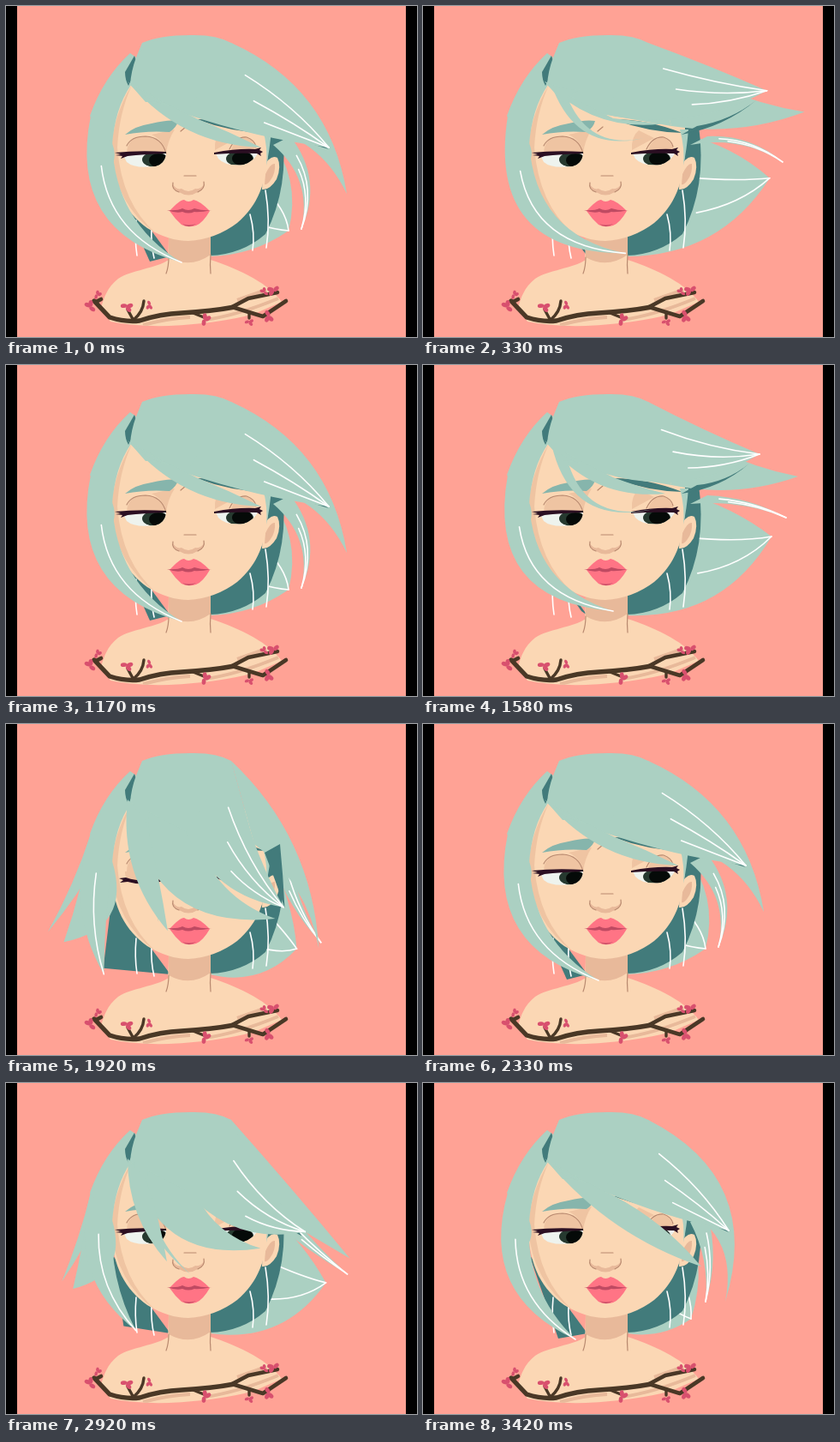
These frames come from a looping animation (480 px wide and 386 px high, 3.51 s). An HTML page:

```html
<!DOCTYPE html>
<html lang="en">
<head>
<meta charset="utf-8">
<title>Wind in her hair</title>
<style>
  html, body { margin: 0; width: 100%; height: 100%; overflow: hidden; background: #000; }
  svg { display: block; width: 100vw; height: 100vh; }
  .skin { fill: #fbd7b4; }
  .shade { fill: #e8b99a; }
  .soft { fill: #efc4a2; }
  .fine { fill: none; stroke: #b98a70; stroke-width: 1.2; stroke-linecap: round; }
  .lash { fill: #2b0f22; }
  .iris { fill: #26392f; }
  .pupil { fill: #050a08; }
  .twig { fill: none; stroke: #4a3826; stroke-linecap: round; stroke-linejoin: round; }
  .light { fill: #abd0c2; }
  .dark { fill: #427b7b; }
  .strand { fill: none; stroke: #fff; stroke-width: 1.6; stroke-linecap: round; }
</style>
</head>
<body>
<svg viewBox="0 0 480 386">
  <defs>
    <clipPath id="bodyClip"><path id="torso" d="M190 296C175 306 146 308 131 318C118 328 114 341 111 352L122 368Q150 374 190 373Q250 370 290 359L322 345C308 325 276 308 239 296Z"/></clipPath>
    <clipPath id="eyeL"><path id="whiteL" d="M137 174Q160 170 187 171Q186 184 174 187Q150 190 141 182Z"/></clipPath>
    <clipPath id="eyeR"><path id="whiteR" d="M245 172Q270 168 296 169Q290 181 277 185Q256 187 248 178Z"/></clipPath>
    <g id="flower" fill="#d8506e">
      <ellipse cx="-3.5" rx="3.5" ry="2.3" transform="rotate(20)"/>
      <ellipse cy="-3" rx="2.3" ry="3.4"/>
      <ellipse cx="3" cy="1.5" rx="3.4" ry="2.2" transform="rotate(35)"/>
    </g>
  </defs>

  <rect x="13" width="454" height="386" fill="#ffa295"/>

  <g id="back"></g>
  <path class="dark" d="M300 140H322Q332 210 303 266Q275 290 238 291V240Z"/>
  <path class="strand" d="M303 215Q309 250 304 282M285 243Q291 265 288 285M152 250Q150 272 153 291M170 258Q169 278 173 294"/>

  <use href="#torso" class="skin"/>
  <path class="skin" d="M190 260H239V314H187Q190 300 190 260Z"/>
  <path class="shade" d="M190 260H239V290Q215 307 190 293Z"/>
  <path class="fine" d="M190 293Q190 304 187 312M239 290Q238 302 239 312"/>
  <path clip-path="url(#bodyClip)" fill="none" stroke="#e8b99a" stroke-width="4" d="M232 366Q270 361 318 341M270 343L304 331M160 372Q190 364 215 363"/>
  <g class="twig">
    <path stroke-width="5.4" d="M103 344L121 363Q140 369 156 367Q180 359 205 358Q240 356 267 351"/>
    <path stroke-width="4.6" d="M264 351L300 362L327 344M264 351L283 341L317 334M105 345L111 342"/>
    <path stroke-width="3.4" d="M148 365L142 354M149 366Q160 357 161 344M216 357L231 363M284 357V364"/>
  </g>
  <g id="flowers"></g>

  <path class="skin" d="M300 190Q308 172 317 177Q322 187 316 202Q308 215 299 214Z"/>
  <path class="shade" d="M303 196Q309 183 314 184Q315 195 309 203Q305 209 302 208Z"/>
  <path class="skin" d="M150 78C134 108 122 140 123 170C124 215 140 241 165 259Q190 274 213 274Q245 272 270 253C295 232 304 205 306 170V120Q240 60 150 78Z"/>
  <path class="soft" d="M147 92Q124 130 123 170Q128 232 175 265Q135 230 130 165Q132 125 147 92Z"/>

  <path class="shade" d="M195 208Q199 215 205 213Q213 219 221 213Q228 214 231 208Q232 214 224 217Q213 224 202 217Q194 214 195 208Z"/>
  <path class="fine" d="M208 198H222M195 206Q193 214 202 217M231 205Q233 213 224 217M204 146L210 141"/>
  <path fill="#ff7485" d="M191 239Q203 226 208 226Q213 230 219 226Q226 227 238 239Q230 253 222 256Q212 259 205 255Q197 248 191 239Z"/>
  <path fill="#bf4a62" d="M188 238Q200 239 206 236Q213 240 220 236Q230 239 240 238Q226 241 220 240Q213 243 206 240Q199 242 188 238ZM206 254Q213 257 222 254Q213 260 206 254Z"/>

  <path class="soft" d="M187 172Q184 156 170 150L197 144Q189 156 187 172ZM244 168Q243 152 252 145L270 154Z"/>
  <path class="soft" d="M141 172Q141 152 163 152Q184 152 187 172ZM262 170Q267 154 280 153Q291 157 293 169Z"/>
  <path class="fine" d="M141 163Q146 152 163 152Q182 153 187 172M261 167Q268 152 281 153Q290 156 292 164"/>
  <g id="open">
    <use href="#whiteL" fill="#eef3ee"/>
    <g clip-path="url(#eyeL)"><ellipse class="iris" cx="174" cy="179" rx="15" ry="9"/><ellipse class="pupil" cx="178" cy="180" rx="11" ry="8"/></g>
    <use href="#whiteR" fill="#eef3ee"/>
    <g clip-path="url(#eyeR)"><ellipse class="iris" cx="273" cy="178" rx="16" ry="9"/><ellipse class="pupil" cx="276" cy="178" rx="12" ry="8"/></g>
    <path class="lash" d="M187 172Q160 173 142 175L134 178L136 175L128 174L134 173L127 171Q155 168 187 170ZM243 171Q270 166 291 167L298 165L296 168L300 170L297 172L298 175L293 172Q268 171 243 173Z"/>
  </g>
  <g id="closed">
    <path class="soft" d="M139 172Q138 181 150 184Q172 186 186 180L187 171ZM248 172Q256 184 275 183L296 174V168Z"/>
    <path class="lash" d="M186 180Q160 186 140 179L132 180L137 182L133 185L142 184Q164 190 186 182ZM246 178Q270 186 297 174Q272 190 246 180Z"/>
  </g>
  <path fill="#86b5ac" d="M139 150Q150 140 170 137Q190 132 201 134Q199 142 191 147Q164 145 139 150Z"/>
  <path class="dark" d="M222 132Q262 132 303 148Q262 147 222 132Z"/>
  <path class="light" d="M300 144H310Q308 168 304 186Q306 166 300 144Z"/>

  <g id="right"></g>
  <g id="left"></g>
  <path class="light" d="M145 55Q114 83 98 128L99 130L124 162Q127 120 146 92L152 60Z"/>
  <path class="dark" d="M150 58L139 77Q139 86 143 93L154 70Z"/>
  <path class="light" d="M159 43Q180 34 215 34Q245 33 263 43L290 140L210 126Q165 112 145 92Q146 76 152 60Z"/>
  <g id="fringe"></g>

  <path d="M0 0H13V386H0ZM467 0H480V386H467Z"/>
</svg>
<script>
const NS = "http://www.w3.org/2000/svg";
const $ = id => document.getElementById(id);

// One swing: steps at which hair is at rest, blown out, over the face, settling.
const KEYS = [0, 5, 8, 13], CYCLE = 14, STEPS = 42, LOOP = 3510;

// A lock runs from two roots to one tip; each pose is tip x, tip y, bend.
// "puff" spreads its two edges apart, "strands" are white hairs inside it.
const locks = {
  back: [
    { roots: [305, 150, 238, 292], puff: .2, strands: 2,
      poses: [[330, 262, .05], [407, 200, -.1], [355, 250, -.1], [313, 275, 0]] },
    { kind: "dark", roots: [124, 200, 192, 292],
      poses: [[168, 298, 0], [185, 287, 0], [118, 283, 0], [158, 298, 0]] }
  ],
  right: [
    { roots: [332, 152, 312, 162], strands: 2,
      poses: [[345, 260, .3], [424, 178, .12], [383, 245, -.1], [330, 255, .15]] },
    { roots: [263, 43, 290, 140],
      poses: [[398, 219, .27], [438, 130, -.14], [383, 240, .1], [353, 255, .42]] },
    { kind: "dark", roots: [320, 140, 302, 150],
      poses: [[377, 167, .05], [381, 115, -.15], [331, 206, 0], [357, 174, 0]] }
  ],
  left: [
    { roots: [99, 128, 112, 150],
      poses: [[112, 200, 0], [112, 200, 0], [48, 243, .05], [112, 200, 0]] },
    { roots: [99, 128, 124, 160], puff: -.25,
      poses: [[108, 200, .2], [108, 200, .2], [67, 255, .3], [108, 200, .2]] },
    { roots: [99, 128, 124, 160], puff: -.1, strands: 1,
      poses: [[205, 299, -.37], [222, 287, -.45], [123, 290, -.15], [178, 299, -.33]] }
  ],
  fringe: [
    { roots: [222, 131, 146, 92], puff: .12,
      poses: [[298, 165, -.1], [283, 150, -.15], [305, 212, -.4], [325, 214, -.02]] },
    { roots: [263, 43, 210, 126], puff: .1, strands: 3,
      poses: [[377, 165, .05], [393, 104, -.12], [331, 204, -.2], [357, 172, .05]] },
    { roots: [166, 100, 150, 92],
      poses: [[190, 117, 0], [270, 168, -.5], [189, 240, -.1], [190, 117, 0]] },
    { roots: [163, 112, 142, 88], puff: .12,
      poses: [[185, 115, 0], [185, 115, 0], [189, 243, -.1], [185, 115, 0]] }
  ]
};

const mix = (p, q, u) => p.map((x, i) => x + (q[i] - x) * u);
const fmt = p => p.map(x => x.toFixed(1)).join(" ");

// Control point of a hair from root to tip, pushed sideways by the bend.
function bow([x, y], [tx, ty], bend) {
  return [(x + tx) / 2 + (ty - y) * bend, (y + ty) / 2 - (tx - x) * bend];
}

function addPath(parent, kind) {
  const el = document.createElementNS(NS, "path");
  el.setAttribute("class", kind);
  return parent.appendChild(el);
}

// Cyclic cubic interpolation through unevenly spaced poses.
function sample(poses, step) {
  const n = KEYS.length;
  const wrap = i => (i + n) % n;
  const gap = i => (KEYS[wrap(i + 1)] - KEYS[wrap(i)] + CYCLE) % CYCLE;
  const i = KEYS.findLastIndex(k => k <= step);
  const h = gap(i), s = (step - KEYS[i]) / h, r = 1 - s;
  return poses[0].map((_, c) => {
    const at = j => poses[wrap(j)][c];
    const rate = j => (at(j + 1) - at(j)) / gap(j);
    const slope = j => (rate(j - 1) * gap(j) + rate(j) * gap(j - 1)) / (gap(j) + gap(j - 1));
    return at(i) * (1 + 2 * s) * r * r + at(i + 1) * s * s * (3 - 2 * s)
      + h * s * r * (slope(i) * r - slope(i + 1) * s);
  });
}

function makeLock(parent, { kind = "light", roots, puff = 0, strands = 0, poses }) {
  const a = roots.slice(0, 2), b = roots.slice(2);
  const body = addPath(parent, kind);
  const hairs = Array.from({ length: strands }, () => addPath(parent, "strand"));
  return step => {
    const [x, y, bend] = sample(poses, step), tip = [x, y];
    const ca = bow(a, tip, bend + puff), cb = bow(b, tip, bend - puff);
    body.setAttribute("d", `M${fmt(a)}Q${fmt(ca)} ${fmt(tip)}Q${fmt(cb)} ${fmt(b)}Z`);
    hairs.forEach((el, i) => {
      const u = (i + 1) / (strands + 1), from = .2 + .15 * i;
      const root = mix(a, b, u), c = mix(ca, cb, u), c2 = mix(c, tip, from);
      const start = mix(mix(root, c, from), c2, from);
      el.setAttribute("d", `M${fmt(start)}Q${fmt(c2)} ${fmt(tip)}`);
    });
  };
}

const flowers = [[99, 350], [107, 337], [141, 351], [167, 349], [312, 331], [302, 333], [233, 366], [284, 369], [306, 362]];
$("flowers").innerHTML = flowers.map(([x, y], i) =>
  `<use href="#flower" transform="translate(${x} ${y}) rotate(${i * 70}) scale(${i % 2 ? .8 : 1.1})"/>`).join("");

const hair = Object.entries(locks).flatMap(([id, list]) => list.map(l => makeLock($(id), l)));
const startOf = k => Math.round(k * 25 / 3) * 10;
const t0 = performance.now();
let shown = -1;

function draw() {
  const t = (performance.now() - t0) % LOOP;
  let k = Math.min(STEPS - 1, Math.floor(t / 83) + 1);
  while (startOf(k) > t) k--;
  const step = k % CYCLE;
  if (step !== shown) {
    shown = step;
    hair.forEach(pose => pose(step));
    const shut = step === 8 || step === 9;
    $("open").style.display = shut ? "none" : "";
    $("closed").style.display = shut ? "" : "none";
  }
  requestAnimationFrame(draw);
}
draw();
</script>
</body>
</html>
```
